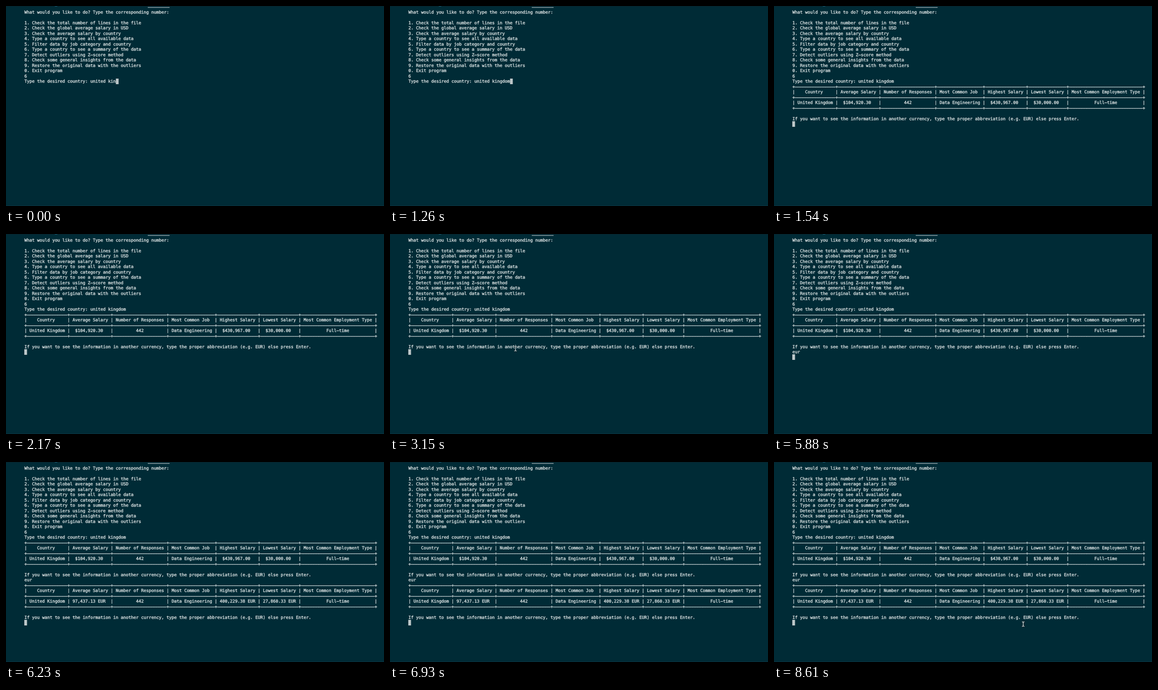
An HTML page that plays this animation: 744x394 px, repeating every 8.68 s.

```html
<!DOCTYPE html>
<html lang="en">
<head>
<meta charset="utf-8">
<title>Salary terminal</title>
<style>
  html, body { margin: 0; width: 100%; height: 100%; overflow: hidden; background: #002b36; }
  svg { display: block; width: 744px; height: 394px; }
  text {
    font: 8.315px "DejaVu Sans Mono", "Liberation Mono", monospace;
    fill: #d0d8d9; stroke: #d0d8d9; stroke-width: .4px;
    white-space: pre; text-rendering: geometricPrecision;
  }
</style>
</head>
<body>
<svg viewBox="0 0 744 394">
  <rect width="744" height="394" fill="#002b36"/>
  <rect width="744" height="1" fill="#08252e"/>
  <rect y="393" width="744" height="1" fill="#0a3440"/>
  <rect x="96" width="5" height="1" fill="#1c5a70"/>
  <rect x="279" y="2" width="43" height="1.6" fill="#82949a"/>
  <g id="screen"></g>
  <rect id="caret" width="5.4" height="11" fill="#bdc7c9"/>
  <g id="pointer" fill="none" stroke-linecap="round">
    <path d="M-2-4.5Q0-4.5 0-3V3Q0 4.5-2 4.5M2-4.5Q0-4.5 0-3V3Q0 4.5 2 4.5" stroke="#0b2027" stroke-width="2.4"/>
    <path d="M-2-4.5Q0-4.5 0-3V3Q0 4.5-2 4.5M2-4.5Q0-4.5 0-3V3Q0 4.5 2 4.5" stroke="#e4eaea" stroke-width="1.2"/>
  </g>
</svg>
<script>
const LOOP = 8680, LEFT = 36, CELL = 5.006, ROW = 10.5;
const $ = id => document.getElementById(id);

const menu = [
  'What would you like to do? Type the corresponding number:', '',
  '1. Check the total number of lines in the file',
  '2. Check the global average salary in USD',
  '3. Check the average salary by country',
  '4. Type a country to see all available data',
  '5. Filter data by job category and country',
  '6. Type a country to see a summary of the data',
  '7. Detect outliers using Z-score method',
  '8. Check some general insights from the data',
  '9. Restore the original data with the outliers',
  '0. Exit program', '6'
];
const ask = 'Type the desired country: united kin';
const currency = 'If you want to see the information in another currency, ' +
  'type the proper abbreviation (e.g. EUR) else press Enter.';
const heads = ['Country', 'Average Salary', 'Number of Responses', 'Most Common Job',
  'Highest Salary', 'Lowest Salary', 'Most Common Employment Type'];
const widths = [14, 14, 19, 16, 14, 13, 27];

function center(s, w) {
  const left = Math.floor((w - s.length) / 2);
  return (' '.repeat(left) + s).padEnd(w);
}

function table(avg, high, low) {
  const line = cells => '| ' + cells.map((c, i) => center(c, widths[i])).join(' | ') + ' |';
  const rule = '+' + widths.map(w => '-'.repeat(w + 2)).join('+') + '+';
  const data = ['United Kingdom', avg, '442', 'Data Engineering', high, low, 'Full-time'];
  return [rule, line(heads), rule, line(data), rule, '', currency];
}

const asked = s => [...menu, ask + s];
const first = [...asked('gdom'), ...table('$104,920.30', '$430,967.00', '$30,000.00')];
const second = [...first, 'eur', ...table('97,437.13 EUR', '400,229.38 EUR', '27,860.33 EUR')];

// [time, lines]; the caret follows the last line
const states = [
  [0, asked('')],
  [210, asked('g')], [280, asked('gd')], [350, asked('gdoo')], [560, asked('gdoom')],
  [770, asked('gdoo')], [840, asked('gdo')], [910, asked('gd')],
  [1120, asked('gdo')], [1260, asked('gdom')],
  [1540, [...first, '']],
  [4130, [...first, 'e']], [4200, [...first, 'eu']], [4270, [...first, 'eur']],
  [5110, [...first, 'eur', '']],
  [6230, [...second, '']]
];

// Pointer runs: [time, x, y], hidden outside each run
const runs = [
  [[2660, 212, 284], [2870, 222, 262], [3150, 247, 226], [3290, 350, 242],
   [3430, 470, 268], [3500, 507, 272], [4130, 507, 272]],
  [[8470, 505, 277], [8540, 497, 299], [8610, 490.5, 319.3], [8680, 490.5, 319.3]]
];

const rows = second.map((_, i) => {
  const el = document.createElementNS('http://www.w3.org/2000/svg', 'text');
  el.setAttribute('x', LEFT + .2);
  el.setAttribute('y', 14.9 + i * ROW);
  return $('screen').appendChild(el);
});

let shown;
function show(lines) {
  if (lines === shown) return;
  shown = lines;
  // Wide dashes join up into continuous table rules
  rows.forEach((el, i) => { el.textContent = (lines[i] || '').replace(/-/g, '–'); });
  const last = lines.length - 1;
  $('caret').setAttribute('x', LEFT + lines[last].length * CELL);
  $('caret').setAttribute('y', Math.floor(6.5 + last * ROW));
}

function pointerAt(t) {
  const run = runs.find(r => t >= r[0][0] && t < r[r.length - 1][0]);
  if (!run) return null;
  const i = run.findIndex(p => p[0] > t);
  const [t0, x0, y0] = run[i - 1], [t1, x1, y1] = run[i];
  const k = (t - t0) / (t1 - t0);
  return [x0 + (x1 - x0) * k, y0 + (y1 - y0) * k];
}

function draw(t) {
  show(states.filter(s => s[0] <= t).pop()[1]);
  const p = pointerAt(Math.floor(t / 70) * 70);
  $('pointer').setAttribute('visibility', p ? 'visible' : 'hidden');
  if (p) $('pointer').setAttribute('transform', `translate(${p[0]} ${p[1]})`);
}

const start = performance.now();
function tick() {
  draw((performance.now() - start) % LOOP);
  requestAnimationFrame(tick);
}
tick();
</script>
</body>
</html>
```
